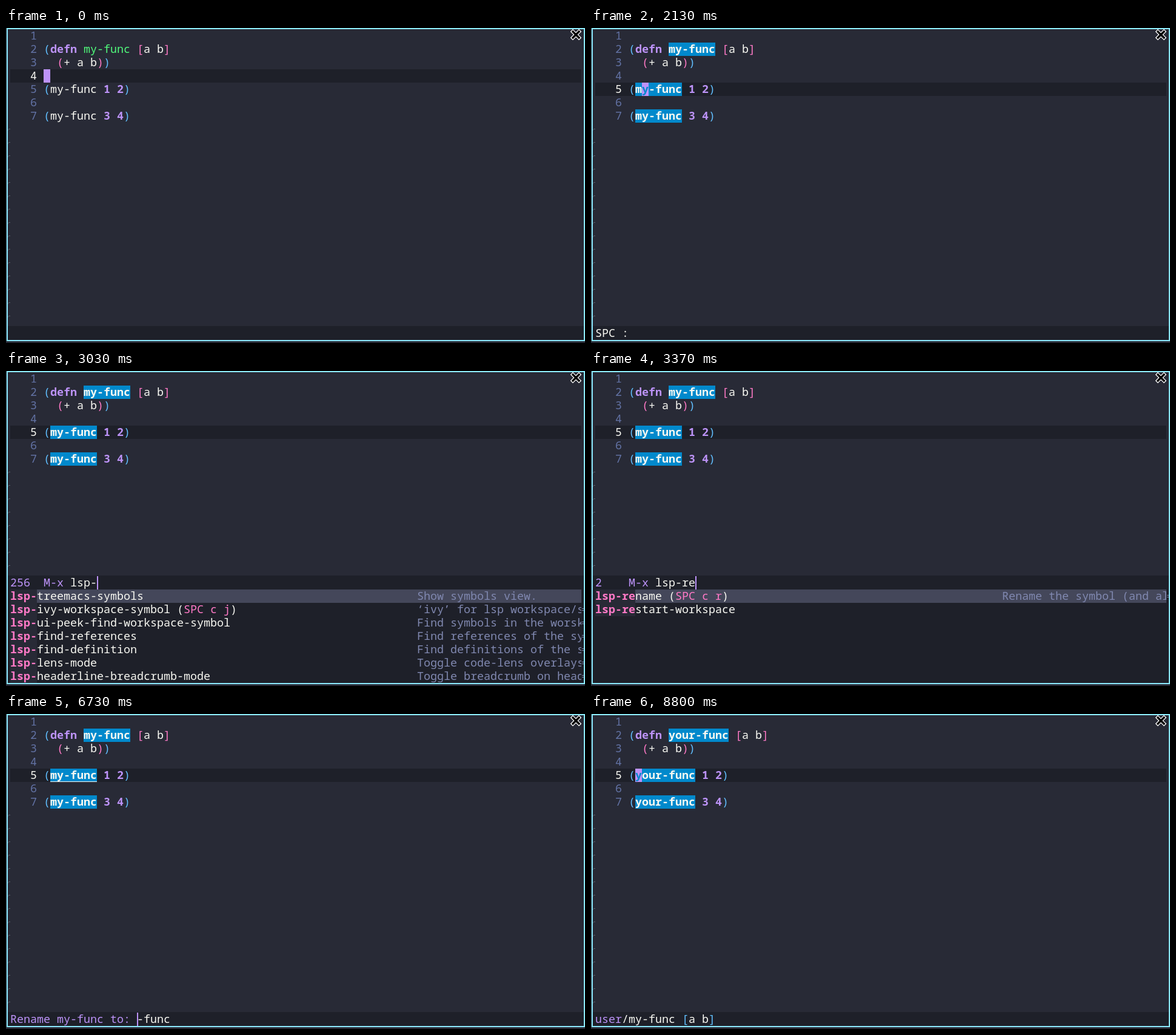
Animation of 955x519 px, one loop 9.56 s. Source, as an HTML page:

```html
<!DOCTYPE html>
<html lang="en">
<head>
<meta charset="utf-8">
<title>Rename symbol</title>
<style>
html, body { margin: 0; width: 100%; height: 100%; overflow: hidden; background: #282a36; }
svg { display: block; }
text { font: 18.333px "Noto Sans Mono", "DejaVu Sans Mono", monospace; white-space: pre; font-variant-ligatures: none; }
.bold { font-weight: 700; }
</style>
</head>
<body>
<svg id="stage" width="955" height="519" viewBox="0 0 955 519">
  <defs><clipPath id="pane"><rect x="3" y="2" width="946" height="512"/></clipPath></defs>
  <rect width="955" height="519" fill="#282a36"/>
  <g id="view" clip-path="url(#pane)"></g>
  <g id="fringe" fill="none"></g>
  <rect x="2" y="1" width="952" height="514" fill="none" stroke="#8be9fd" stroke-width="2"/>
  <g fill="none" stroke-linecap="square">
    <path d="M935 6L945 16M945 6L935 16" stroke="#fff" stroke-width="6"/>
    <path d="M935 6L945 16M945 6L935 16" stroke="#000" stroke-width="3.4"/>
  </g>
</svg>
<script>
const LOOP = 9560, CELL = 11, ROW = 22, LEFT = 7, CODE = 62, ECHO_TOP = 492;
const C = {
  fg: '#f8f8f2', dark: '#1e2029', bg: '#282a36', dim: '#6272a4', purple: '#bd93f9', green: '#50fa7b',
  pink: '#ff79c6', blue: '#61bfff', mark: '#0189cc', red: '#ff5555', select: '#44475a', doc: '#8088b0'
};
const view = document.getElementById('view');
const fringe = document.getElementById('fringe');

const rowTop = line => 2 + ROW * (line - 1);
const escapeText = s => s.replace(/&/g, '&amp;').replace(/</g, '&lt;');
const rect = (x, y, w, h, fill) => `<rect x="${x}" y="${y}" width="${w}" height="${h}" fill="${fill}"/>`;
const label = (x, top, s, fill = C.fg, bold = false) =>
  `<text x="${x}" y="${top + 17}" fill="${fill}"${bold ? ' class="bold"' : ''}>${escapeText(s)}</text>`;

// Lays out [text, colour, bold, background] runs on the character grid.
function runs(x, top, parts) {
  let out = '';
  for (const [s, fill, bold, back] of parts) {
    const width = s.length * CELL;
    if (back) out += rect(x, top, width, ROW, back);
    out += label(x, top, s, fill, bold);
    x += width;
  }
  return out;
}

const commands = {
  lsp: ['lsp', '', 'Entry point for the server startup.'],
  rename: ['lsp-rename', 'SPC c r', 'Rename the symbol (and all references)'],
  restart: ['lsp-restart-workspace', '', '']
};
const recent = [
  ['lsp-treemacs-symbols', '', 'Show symbols view.'],
  ['lsp-ivy-workspace-symbol', 'SPC c j', '‘ivy’ for lsp workspace/symbol.'],
  ['lsp-ui-peek-find-workspace-symbol', '', 'Find symbols in the worskpace.'],
  ['lsp-find-references', '', 'Find references of the symbol under point.'],
  ['lsp-find-definition', '', 'Find definitions of the symbol under point.'],
  ['lsp-lens-mode', '', 'Toggle code-lens overlays.'],
  ['lsp-headerline-breadcrumb-mode', '', 'Toggle breadcrumb on headerline.']
];
const rust = [
  ['run', 'Select and run a runnable action.'],
  ['rerun', 'Rerun the last runnable action.'],
  ['join-lines', 'Join selected lines into one.'],
  ['expand-macro', 'Expands the macro call at point.'],
  ['inlay-hints-mode', 'Toggle inlay hints in the buffer.']
].map(([name, doc]) => ['lsp-rust-analyzer-' + name, '', doc]);

const signature = [['user', C.purple], ['/', C.fg], ['my-func', C.fg], [' ', C.fg], ['[', C.blue], ['a b', C.fg], [']', C.blue]];
const plain = s => [[s, C.fg]];
const palette = (input, count, list) => ({ menu: { input, count, list }, cursor: null });
const prompt = (input, at) => ({ prompt: { input, at } });

// Each step changes part of the editor state at its time.
const steps = [
  [0, { name: 'my-func', line: 4, cursor: 0, paren: false, marked: false, echo: [] }],
  [770, { line: 5 }],
  [900, { paren: true }],
  [1270, { cursor: 2, paren: false }],
  [1700, { marked: true, echo: signature }],
  [2000, { echo: plain('SPC-') }],
  [2130, { echo: plain('SPC :') }],
  [2300, palette('', 6214, recent)],
  [2570, palette('l', 2873, recent)],
  [2730, palette('ls', 313, recent)],
  [2870, palette('lsp', 258, [commands.lsp, ...recent.slice(0, 6)])],
  [3030, palette('lsp-', 256, recent)],
  [3200, palette('lsp-r', 23, [commands.rename, commands.restart, ...rust])],
  [3370, palette('lsp-re', 2, [commands.rename, commands.restart])],
  [3530, palette('lsp-ren', 1, [commands.rename])],
  [4500, { menu: null, underline: true, ...prompt('my-func', 7) }],
  [5530, prompt('my-func', 6)],
  [5770, prompt('my-func', 5)],
  [5930, prompt('my-func', 4)],
  [6100, prompt('my-func', 3)],
  [6230, prompt('my-func', 2)],
  [6730, prompt('-func', 0)],
  [7070, prompt('y-func', 1)],
  [7230, prompt('you-func', 3)],
  [7700, prompt('your-func', 4)],
  [8230, { prompt: null, underline: false, marked: false, name: 'your-func', cursor: 1,
    echo: plain('Applying 3 edits to ‘a.clj’ done') }],
  [8800, { marked: true, echo: signature }]
];

function drawCode(s) {
  const symbol = color => s.marked ? [s.name, C.fg, true, C.mark] : [s.name, color];
  const call = (a, b, matched) => [
    ['(', matched ? C.red : C.blue, matched], symbol(C.fg), [' ', C.fg], [a, C.purple, true],
    [' ', C.fg], [b, C.purple, true], [')', matched ? C.red : C.blue, matched]
  ];
  const lines = [
    [],
    [['(', C.blue], ['defn', C.purple, true], [' ', C.fg], symbol(C.green), [' ', C.fg],
      ['[', C.pink], ['a b', C.fg], [']', C.pink]],
    [['  ', C.fg], ['(', C.pink], ['+ a b', C.fg], [')', C.pink], [')', C.blue]],
    [],
    call('1', '2', s.paren),
    [],
    call('3', '4', false)
  ];
  let out = rect(LEFT, rowTop(s.line), 942, ROW, C.dark);
  lines.forEach((parts, i) => {
    const top = rowTop(i + 1);
    out += label(40, top, String(i + 1), i + 1 === s.line ? C.fg : C.dim);
    out += runs(CODE, top, parts);
  });
  if (s.underline) out += rect(CODE + CELL, 111, s.name.length * CELL, 1, C.fg);
  if (s.cursor !== null && !s.prompt) {
    const x = CODE + s.cursor * CELL, top = rowTop(s.line);
    const under = s.line === 5 ? ('(' + s.name)[s.cursor] : '';
    out += rect(x, top, CELL, ROW, C.purple);
    if (under) out += label(x, top, under, s.marked ? C.mark : C.dark, s.marked || s.paren);
  }
  return out;
}

function drawMenu({ input, count, list }) {
  const top = ECHO_TOP - 7 * ROW, n = input.length;
  let out = rect(3, top - 1, 950, 178, C.dark);
  out += runs(LEFT, top, [[String(count).padEnd(5), C.purple], ['M-x ', C.purple], [input, C.fg]]);
  out += rect(LEFT + (9 + n) * CELL, top, 2, ROW, C.purple);
  out += rect(LEFT, top + ROW, 942, ROW, C.select);
  list.forEach(([name, keys, doc], i) => {
    const y = top + ROW * (i + 1);
    const parts = [[name.slice(0, n), C.pink, true, C.bg], [name.slice(n), C.fg]];
    if (keys) parts.push([' (', C.fg], [keys, C.pink], [')', C.fg]);
    out += runs(LEFT, y, parts) + label(LEFT + 61 * CELL, y, doc, C.doc);
  });
  return out;
}

function drawEcho(s) {
  let out = rect(3, 491, 950, 23, C.dark);
  if (!s.prompt) return out + runs(LEFT, ECHO_TOP, s.echo);
  const lead = 'Rename my-func to: ';
  out += runs(LEFT, ECHO_TOP, [[lead, C.purple], [s.prompt.input, C.fg]]);
  return out + rect(LEFT + (lead.length + s.prompt.at) * CELL, ECHO_TOP, 2, ROW, C.purple);
}

function drawFringe(s) {
  let tildes = '', cuts = '';
  for (let i = 0; i < (s.menu ? 8 : 15); i++) tildes += `M3.5 ${168.5 + ROW * i}v-1l1-1h2.5`;
  if (s.menu) s.menu.list.forEach((item, i) => {
    if (item[2].length > 24) cuts += `M950 ${369.5 + ROW * i}h3m-3 3h3`;
  });
  const edge = s.menu ? rect(949, 337, 4, 177, C.dark) : rect(949, 491, 4, 23, C.dark);
  return edge + `<path d="${tildes}" stroke="#56616c"/><path d="${cuts}" stroke="${C.doc}"/>`;
}

let shown = -1;
function render(time) {
  const t = time % LOOP;
  const index = steps.filter(([at]) => at <= t).length - 1;
  if (index !== shown) {
    shown = index;
    const state = Object.assign({}, ...steps.slice(0, index + 1).map(step => step[1]));
    view.innerHTML = drawCode(state) + (state.menu ? drawMenu(state.menu) : drawEcho(state));
    fringe.innerHTML = drawFringe(state);
  }
}

const start = performance.now();
function tick() {
  render(performance.now() - start);
  requestAnimationFrame(tick);
}
tick();
</script>
</body>
</html>
```
